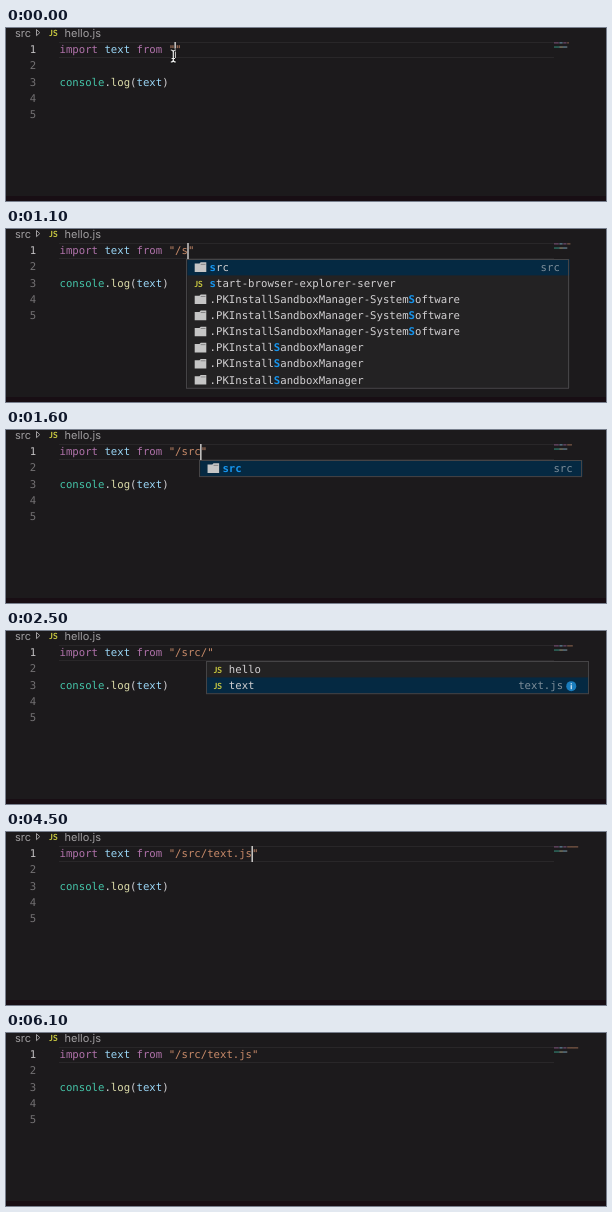
Recreate the animation shown at these times as an HTML page with a canvas. Size 600 by 173 pixels, loop 6.6 s.

```html
<!DOCTYPE html>
<html lang="en">
<head>
<meta charset="utf-8">
<title>Path completion in an editor</title>
<style>
html, body { margin: 0; width: 100%; height: 100%; overflow: hidden; background: #1c1a1c; }
canvas { display: block; width: 600px; height: 173px; }
</style>
</head>
<body>
<canvas id="stage"></canvas>
<script>
const W = 600, H = 173, LOOP = 6600;
const CW = 6.42, LH = 16.1, LEFT = 53.5;
const MONO = '"DejaVu Sans Mono", monospace';
const CODE = '10.66px ' + MONO, BOLD = 'bold ' + CODE;
const UI = '11px Inter, sans-serif';
const ICON = 'bold 8.5px Lato, sans-serif';

const C = {
  bg: '#1c1a1c', strip: '#180e14', rule: '#292729', num: '#737173', numOn: '#c2c0c2',
  crumb: '#a09ea0', kw: '#b072aa', name: '#9ad6f6', str: '#c78a69', type: '#45c4a8',
  fn: '#dcdcaa', plain: '#d2d0d2', js: '#cbcb41', menu: '#232223', edge: '#454446',
  pick: '#052942', hit: '#1795ee', detail: '#7d8d99', folder: '#c5c5c5'
};

const stage = document.getElementById('stage');
const ctx = stage.getContext('2d');
const dpr = window.devicePixelRatio || 1;
stage.width = W * dpr;
stage.height = H * dpr;

const thrice = row => [row, row, row];
const folder = (text, hits = [], detail = '') => ({ text, hits, detail });
const script = (text, hits = [], detail = '') => ({ text, hits, detail, js: true });
const SANDBOX = '.PKInstallSandboxManager';

const rootMenu = {
  col: 1, picked: 0, scroll: true,
  rows: [
    ...thrice(folder('.DocumentRevisions-V100')),
    ...thrice(folder('.HFS+ Private Directory Data⏎')),
    ...thrice(folder(SANDBOX))
  ]
};
rootMenu.rows[0] = folder('.DocumentRevisions-V100', [], '.DocumentRevisions-V100');

// The letters typed so far light up in every match
const matchMenu = n => ({
  col: 1 + n, picked: 0,
  rows: [
    folder('src', [0, 1].slice(0, n), 'src'),
    script('start-browser-explorer-server', [0, 3].slice(0, n)),
    ...thrice(folder(SANDBOX + '-SystemSoftware', [31, 37].slice(0, n))),
    ...thrice(folder(SANDBOX, [10, 23].slice(0, n)))
  ]
});
const srcMenu = { col: 4, picked: 0, rows: [folder('src', [0, 1, 2], 'src')] };
const fileMenu = { col: 5, picked: 1, info: true, rows: [script('hello'), script('text', [], 'text.js')] };

const typed = [
  [0, ''], [700, '/'], [1000, '/s'], [1200, '/sr'], [1400, '/src'], [1900, '/src/'],
  [3200, '/src/text'], [4300, '/src/text.'], [4400, '/src/text.j'], [4500, '/src/text.js']
];
const menus = [
  [0, null], [800, rootMenu], [1100, matchMenu(1)], [1300, matchMenu(2)],
  [1500, srcMenu], [1900, null], [2000, fileMenu], [3200, null]
];
const caret = [
  [0, 1], [300, 0], [700, 1], [2400, .5], [2500, 0], [2900, .5], [3000, 1],
  [3700, .5], [3800, 0], [4000, .5], [4100, 1], [5000, .5], [5100, 0],
  [5400, .5], [5500, 1], [5900, .5], [6000, 0]
];

function at(track, t) {
  let value = track[0][1];
  for (const [start, v] of track) if (t >= start) value = v;
  return value;
}

function box(x, y, w, h, color) {
  ctx.fillStyle = color;
  ctx.fillRect(x, y, w, h);
}

function label(text, x, y, color, font = CODE, align = 'left') {
  ctx.font = font;
  ctx.fillStyle = color;
  ctx.textAlign = align;
  ctx.fillText(text, x, y);
}

function codeLine(parts, row) {
  let col = 0;
  for (const [text, color] of parts) {
    label(text, LEFT + col * CW, 25.3 + row * LH, color);
    col += text.length;
  }
}

function miniLine(parts, y) {
  let x = 548;
  ctx.globalAlpha = .6;
  for (const [text, color] of parts) {
    for (const ch of text) {
      if (ch !== ' ') box(x, y, .78, 1.3, color);
      x += .78;
    }
  }
  ctx.globalAlpha = 1;
}

function breadcrumb() {
  label('src', 9, 9, C.crumb, UI);
  ctx.strokeStyle = C.crumb;
  ctx.lineWidth = 1;
  ctx.beginPath();
  ctx.moveTo(30.5, 1.5);
  ctx.lineTo(33.8, 4.6);
  ctx.lineTo(30.5, 7.7);
  ctx.closePath();
  ctx.stroke();
  label('JS', 43.3, 8, C.js, ICON);
  label('hello.js', 58.5, 9, C.crumb, UI);
}

function folderIcon(x, y) {
  ctx.fillStyle = C.folder;
  ctx.beginPath();
  ctx.moveTo(x, y + 1.3);
  ctx.lineTo(x + 4.8, y + 1.3);
  ctx.lineTo(x + 6, y);
  ctx.lineTo(x + 11.6, y);
  ctx.lineTo(x + 11.6, y + 9.6);
  ctx.lineTo(x, y + 9.6);
  ctx.fill();
  box(x + 6, y + 1.6, 4.8, .7, '#6c6b6c');
}

function infoIcon(x, y) {
  ctx.fillStyle = '#1a7dbd';
  ctx.beginPath();
  ctx.arc(x, y, 5, 0, 7);
  ctx.fill();
  box(x - .6, y - 3, 1.2, 1.2, '#d8e8f2');
  box(x - .6, y - 1, 1.2, 4, '#d8e8f2');
}

function menuRow(row, x, y, right) {
  if (row.js) label('JS', x + 7, y + 11.3, C.js, ICON);
  else folderIcon(x + 7.3, y + 3);
  const left = x + 22.2, base = y + 11.5;
  [...row.text].forEach((ch, i) => {
    const hit = row.hits.includes(i);
    const color = hit ? C.hit : ch === '⏎' ? '#9a999a' : C.plain;
    label(ch, left + i * CW, base, color, hit ? BOLD : CODE);
  });
  if (row.detail) label(row.detail, right, base, C.detail, CODE, 'right');
}

function drawMenu(menu) {
  const x = LEFT + (18 + menu.col) * CW - .5, y = 30.3, w = 382.4;
  const h = menu.rows.length * LH;
  box(x, y, w, h, C.menu);
  box(x, y + menu.picked * LH, w, LH, C.pick);
  menu.rows.forEach((row, i) => menuRow(row, x, y + i * LH, x + w - (menu.info ? 26 : 10)));
  if (menu.scroll) box(x + w - 10, y + .7, 9.5, 29.5, 'rgba(121,121,121,.4)');
  if (menu.info) infoIcon(x + w - 17.8, y + (menu.picked + .5) * LH + .7);
  ctx.strokeStyle = C.edge;
  ctx.lineWidth = 1;
  ctx.strokeRect(Math.round(x) - .5, 30.5, Math.round(w), h);
}

function pointer(x, y) {
  for (const [color, width] of [['#111', 3], ['#eee', 1.2]]) {
    ctx.strokeStyle = color;
    ctx.lineWidth = width;
    ctx.beginPath();
    ctx.moveTo(x - 2.5, y - 6);
    ctx.quadraticCurveTo(x, y - 6, x, y - 4);
    ctx.lineTo(x, y + 4);
    ctx.quadraticCurveTo(x, y + 6, x - 2.5, y + 6);
    ctx.moveTo(x + 2.5, y - 6);
    ctx.quadraticCurveTo(x, y - 6, x, y - 4);
    ctx.moveTo(x, y + 4);
    ctx.quadraticCurveTo(x, y + 6, x + 2.5, y + 6);
    ctx.moveTo(x - 1.7, y + 2.5);
    ctx.lineTo(x + 1.7, y + 2.5);
    ctx.stroke();
  }
}

function draw(t) {
  const path = at(typed, t), menu = at(menus, t);
  const first = [['import', C.kw], [' text ', C.name], ['from', C.kw], [' "' + path + '"', C.str]];
  const third = [['console', C.type], ['.', C.plain], ['log', C.fn], ['(', C.plain], ['text', C.name], [')', C.plain]];

  ctx.setTransform(dpr, 0, 0, dpr, 0, 0);
  ctx.textRendering = 'geometricPrecision';
  box(0, 0, W, H, C.bg);
  box(0, 168, W, 5, C.strip);
  breadcrumb();

  box(53, 14, 495, 1, C.rule);
  box(53, 29, 495, 1, C.rule);
  for (let i = 0; i < 5; i++) {
    label(String(i + 1), 23.7, 25.3 + i * LH, i ? C.num : C.numOn);
  }
  codeLine(first, 0);
  codeLine(third, 2);
  miniLine(first, 14.2);
  miniLine(third, 18.4);

  ctx.globalAlpha = at(caret, t);
  box(LEFT + (18 + path.length) * CW - .6, 14, 1.4, 16, '#d8d6d4');
  ctx.globalAlpha = 1;

  if (menu) drawMenu(menu);
  if (t < 100) pointer(167.3, 28);
}

const start = performance.now();
function tick() {
  draw((performance.now() - start) % LOOP);
  requestAnimationFrame(tick);
}
tick();
</script>
</body>
</html>
```
